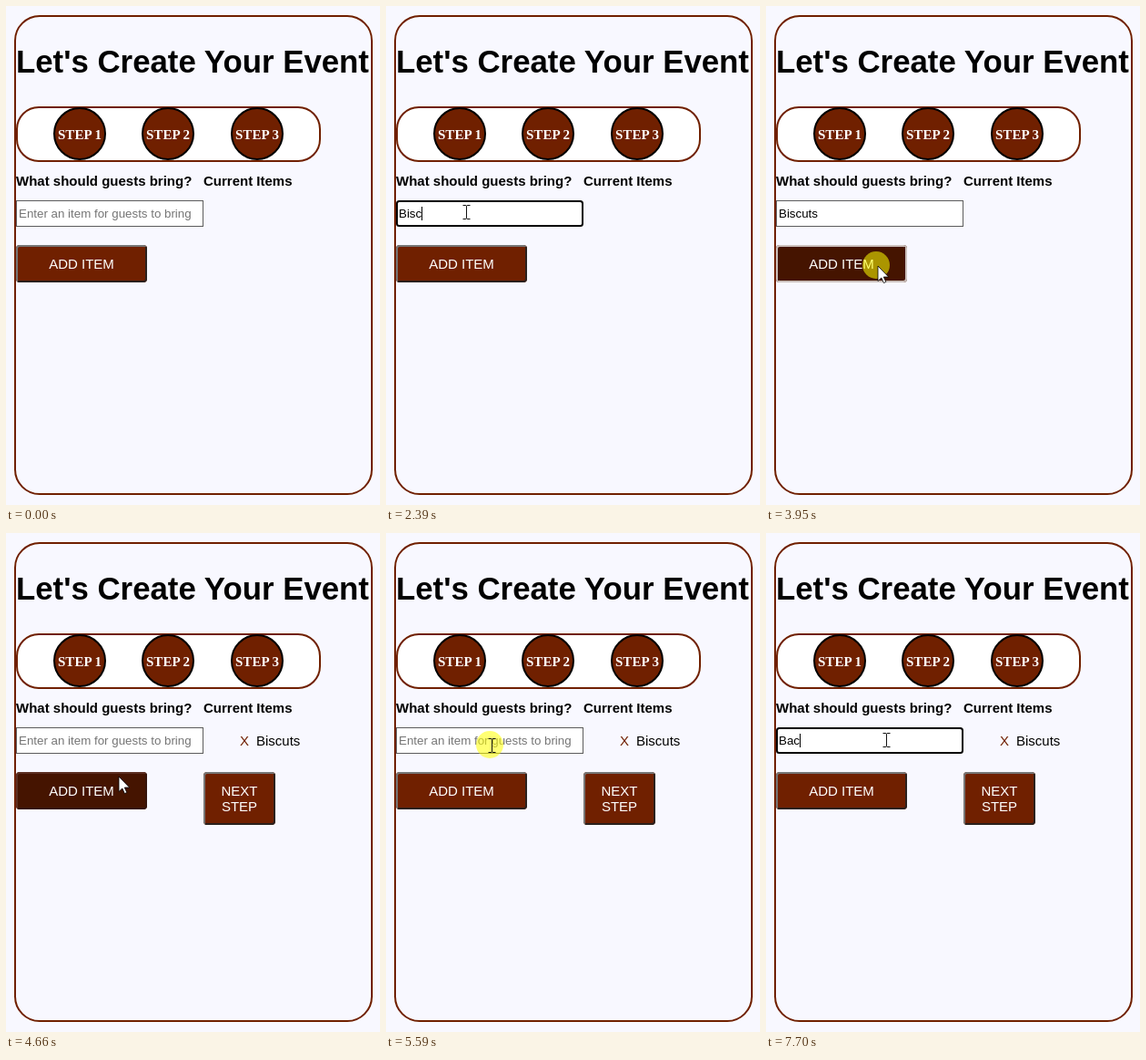
Animation of 411 by 547 pixels, one loop 8 s. Source, as an HTML page:

```html
<!DOCTYPE html>
<html lang="en">
<head>
<meta charset="utf-8">
<title>Event form</title>
<style>
  html, body { margin: 0; width: 100%; height: 100%; overflow: hidden; background: #f8f8ff; }
  svg { display: block; width: 411px; height: 547px; font-family: "Liberation Sans", Arial, sans-serif; font-size: 15px; }
  .title { font-size: 34.8px; font-weight: bold; }
  .label { font-weight: bold; }
  .step { font: bold 15px "Liberation Serif", "Times New Roman", serif; }
  .field { font-size: 13.333px; }
  .mid { fill: #fff; text-anchor: middle; }
</style>
</head>
<body>
<svg id="stage" viewBox="0 0 411 547"></svg>
<script>
const LOOP = 8000, TICK = 78.5;
const BROWN = '#702000', DARK = '#451400';
const stage = document.getElementById('stage');

function add(tag, attrs, parent = stage, text = '') {
  const el = document.createElementNS('http://www.w3.org/2000/svg', tag);
  for (const k in attrs) el.setAttribute(k, attrs[k]);
  el.textContent = text;
  parent.appendChild(el);
  return el;
}
const label = (x, y, cls, text, parent, fill = '#000') =>
  add('text', { x, y, class: cls, fill }, parent, text);
const show = (el, on) => el.setAttribute('visibility', on ? 'visible' : 'hidden');

// Button with a two-tone raised border
function button(x, y, w, h, lines, parent) {
  const r = 3, l = x + 1, t = y + 1, b = y + h - 1, e = x + w - 1;
  const face = add('rect', { x, y, width: w, height: h, rx: 4 }, parent);
  const edge = d => add('path', { d, fill: 'none', 'stroke-width': 2 }, parent);
  const low = edge(`M${l + 1},${b - 1}Q${l + 1},${b} ${l + r},${b}H${e - r}Q${e},${b} ${e},${b - r}V${t + r}Q${e},${t + 1} ${e - 1},${t + 1}`);
  const high = edge(`M${l + 1},${b - 1}Q${l},${b - 1} ${l},${b - r}V${t + r}Q${l},${t} ${l + r},${t}H${e - r}Q${e - 1},${t} ${e - 1},${t + 1}`);
  lines.forEach((s, i) => label(x + w / 2, y + 26 + 17 * i, 'mid', s, parent, '#fff'));
  return (fill, light, shade) => {
    face.setAttribute('fill', fill);
    high.setAttribute('stroke', light);
    low.setAttribute('stroke', shade);
  };
}

// Static page
add('rect', { x: 10, y: 11, width: 392, height: 524, rx: 27, fill: '#f8f8ff', stroke: BROWN, 'stroke-width': 2 });
label(11, 73, 'title', "Let's Create Your Event");
add('rect', { x: 12, y: 111, width: 333, height: 59, rx: 24, fill: '#fff', stroke: BROWN, 'stroke-width': 2 });
[81, 178, 276].forEach((cx, i) => {
  add('circle', { cx, cy: 140, r: 28, fill: BROWN, stroke: '#000', 'stroke-width': 2 });
  label(cx, 146, 'step mid', `STEP ${i + 1}`);
});
label(11, 197, 'label', 'What should guests bring?');
label(217, 197, 'label', 'Current Items');

// Input field
const plain = add('rect', { x: 11.5, y: 213.5, width: 205, height: 28, fill: '#fff', stroke: '#5c5c5c' });
const ring = add('rect', { x: 12, y: 214, width: 204, height: 27, rx: 2.5, fill: '#fff', stroke: '#000', 'stroke-width': 2 });
const hint = label(14, 232, 'field', 'Enter an item for guests to bring', stage, '#757575');
const value = label(14, 232, 'field', '');
const caret = add('rect', { y: 220, width: 1, height: 15 });

const paintAdd = button(11, 262, 144, 41, ['ADD ITEM']);

// Added item and the next button
const result = add('g', {});
label(257, 233, '', 'X', result, BROWN);
label(275, 233, '', 'Biscuts', result);
button(217, 262, 79, 58, ['NEXT', 'STEP'], result)(BROWN, '#767676', '#2b211e');

// Pointer
const pointer = add('g', {});
const glow = add('circle', { cx: -2, cy: -1, r: 15, fill: '#ff0', 'fill-opacity': 0.55 }, pointer);
const arrow = add('path', { d: 'M0,0V16.5L3.8,13L6.4,18.6L8.8,17.5L6.3,12H11.7Z', fill: '#fff', stroke: '#000', 'stroke-width': 0.8 }, pointer);
const beam = add('path', { d: 'M-3.5,-7.5H-1Q.5,-7.5 .5,-6.5Q.5,-7.5 2,-7.5H4.5M.5,-6.5V6.5M-3.5,7.5H-1Q.5,7.5 .5,6.5Q.5,7.5 2,7.5H4.5', fill: 'none', stroke: '#111' }, pointer);

// Each move: points of [time, x, y]
const moves = [
  [[110, 283, 470], [270, 165, 386], [350, 136, 348], [500, 112, 298], [640, 92, 240], [735, 84, 225]],
  [[980, 86, 226], [1050, 88, 226]],
  [[3470, 90, 232], [3640, 108, 262], [3860, 123, 285]],
  [[4360, 123, 279], [4510, 124, 267]],
  [[4900, 124, 267], [5210, 123, 250]],
  [[5360, 119, 240], [5510, 116, 233], [5595, 116, 233], [5830, 132, 227]]
];
const typed = [
  [0, ''], [1840, 'B'], [1990, 'Bi'], [2160, 'Bis'], [2390, 'Bisc'], [2540, 'Biscu'],
  [2710, 'Biscut'], [3010, 'Biscuts'], [4660, ''], [6550, 'B'], [6700, 'Ba'],
  [7080, 'Bac'], [7540, 'Ba'], [7700, 'Bac']
];
const within = (t, ...spans) => spans.some(([a, b]) => t >= a && t < b);

function place(t) {
  const pts = moves.filter(m => t >= m[0][0]).pop();
  if (!pts) return null;
  const start = pts[0][0], end = pts[pts.length - 1];
  if (t >= end[0]) return end.slice(1);
  const s = start + Math.floor((t - start) / TICK) * TICK;
  const i = pts.findIndex(p => p[0] > s);
  const [t0, x0, y0] = pts[i - 1], [t1, x1, y1] = pts[i];
  const k = (s - t0) / (t1 - t0);
  return [x0 + (x1 - x0) * k, y0 + (y1 - y0) * k];
}

function draw(t) {
  const text = typed.filter(e => t >= e[0]).pop()[1];
  value.textContent = text;
  show(hint, !text);
  show(result, t >= 4660);

  const focus = within(t, [735, 3860], [5660, LOOP]);
  show(plain, !focus);
  show(ring, focus);
  show(caret, focus && !within(t, [1370, 1840], [3510, 3860], [6150, 6550]));
  caret.setAttribute('x', text ? Math.round(14 + value.getComputedTextLength()) : 14);

  const pos = place(t);
  show(pointer, pos);
  const [x, y] = pos || [0, 0];
  const inField = y > 212 && y < 243, over = x > 11 && x < 155 && y > 262 && y < 303;
  pointer.setAttribute('transform', `translate(${Math.round(x)},${Math.round(y)})`);
  arrow.setAttribute('display', inField ? 'none' : 'inline');
  beam.setAttribute('display', inField ? 'inline' : 'none');
  glow.setAttribute('display', within(t, [735, 900], [3860, 4190], [5510, 5750]) ? 'inline' : 'none');

  if (within(t, [3860, 4270])) paintAdd(DARK, '#cbc0bc', '#cbc0bc');
  else if (over) paintAdd(DARK, '#5b2f22', '#35150b');
  else paintAdd(BROWN, '#767676', '#2b211e');
}

function frame(now) {
  draw(now % LOOP);
  requestAnimationFrame(frame);
}
draw(0);
requestAnimationFrame(frame);
</script>
</body>
</html>
```
